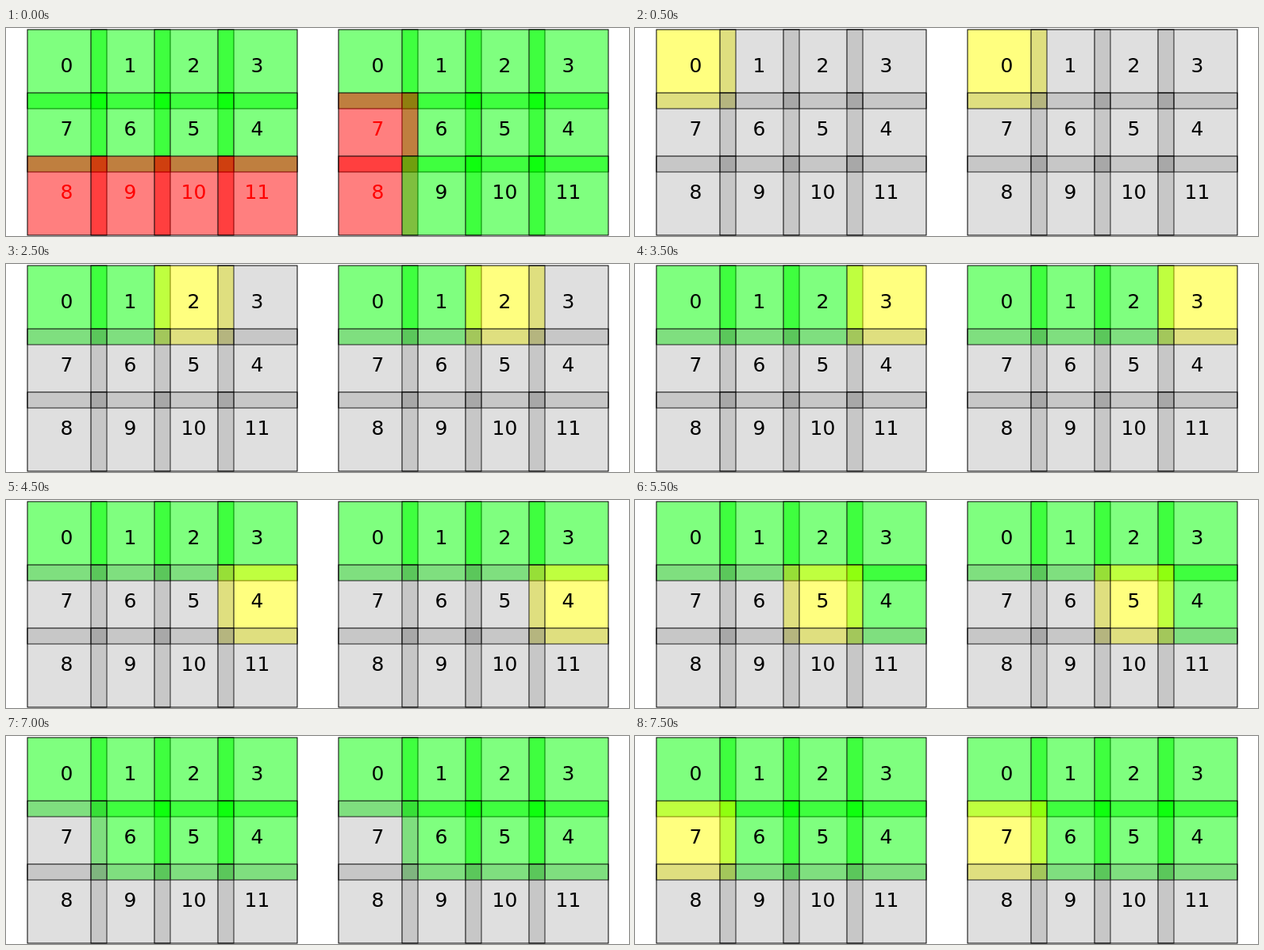
Recreate the animation shown at these times as an HTML page with a canvas. Size 785 by 263 pixels, loop 8 s.

```html
<!DOCTYPE html>
<html lang="en">
<head>
<meta charset="utf-8">
<title>Overlapping tiles</title>
<style>
html, body { margin: 0; width: 100%; height: 100%; overflow: hidden; background: #fff; }
canvas { display: block; }
</style>
</head>
<body>
<canvas id="stage" width="785" height="263"></canvas>
<script>
const ctx = document.getElementById('stage').getContext('2d');

const COLS = 4, COUNT = 12, SIZE = 100, STRIDE = 80;
const STEP = 500, STEPS = 16;
const TOP = 2, LEFTS = [27, 419];
const FILL = {
  idle: 'rgba(128,128,128,.25)',
  busy: 'rgba(255,255,0,.5)',
  done: 'rgba(0,255,0,.5)',
  fail: 'rgba(255,0,0,.5)'
};
const FAILED = [[8, 9, 10, 11], [7, 8]];

// Step 0 shows the outcome; each tile then takes one busy and one done step.
function stateOf(panel, tile, step) {
  if (step === 0) return FAILED[panel].includes(tile) ? 'fail' : 'done';
  const active = (step - 1) >> 1;
  if (tile > active) return 'idle';
  return tile === active && step % 2 ? 'busy' : 'done';
}

// Tiles run back and forth, row by row.
function place(tile) {
  const row = Math.floor(tile / COLS), k = tile % COLS;
  return [row % 2 ? COLS - 1 - k : k, row];
}

function drawTile(panel, tile, step) {
  const [col, row] = place(tile);
  const x = LEFTS[panel] + col * STRIDE, y = TOP + row * STRIDE;
  const state = stateOf(panel, tile, step);
  ctx.fillStyle = FILL[state];
  ctx.fillRect(x, y, SIZE, SIZE);
  ctx.strokeStyle = '#000';
  ctx.lineWidth = 1;
  ctx.strokeRect(x, y, SIZE, SIZE);
  ctx.fillStyle = state === 'fail' ? '#f00' : '#000';
  ctx.fillText(tile, x + 49.5, y + 54);
}

function draw(step) {
  ctx.fillStyle = '#fff';
  ctx.fillRect(0, 0, 785, 263);
  ctx.font = '25px "DejaVu Sans", sans-serif';
  ctx.textAlign = 'center';
  for (let panel = 0; panel < 2; panel++) {
    for (let tile = 0; tile < COUNT; tile++) drawTile(panel, tile, step);
  }
}

const start = performance.now();
function tick() {
  draw(Math.floor((performance.now() - start) / STEP) % STEPS);
  requestAnimationFrame(tick);
}
tick();
</script>
</body>
</html>
```
